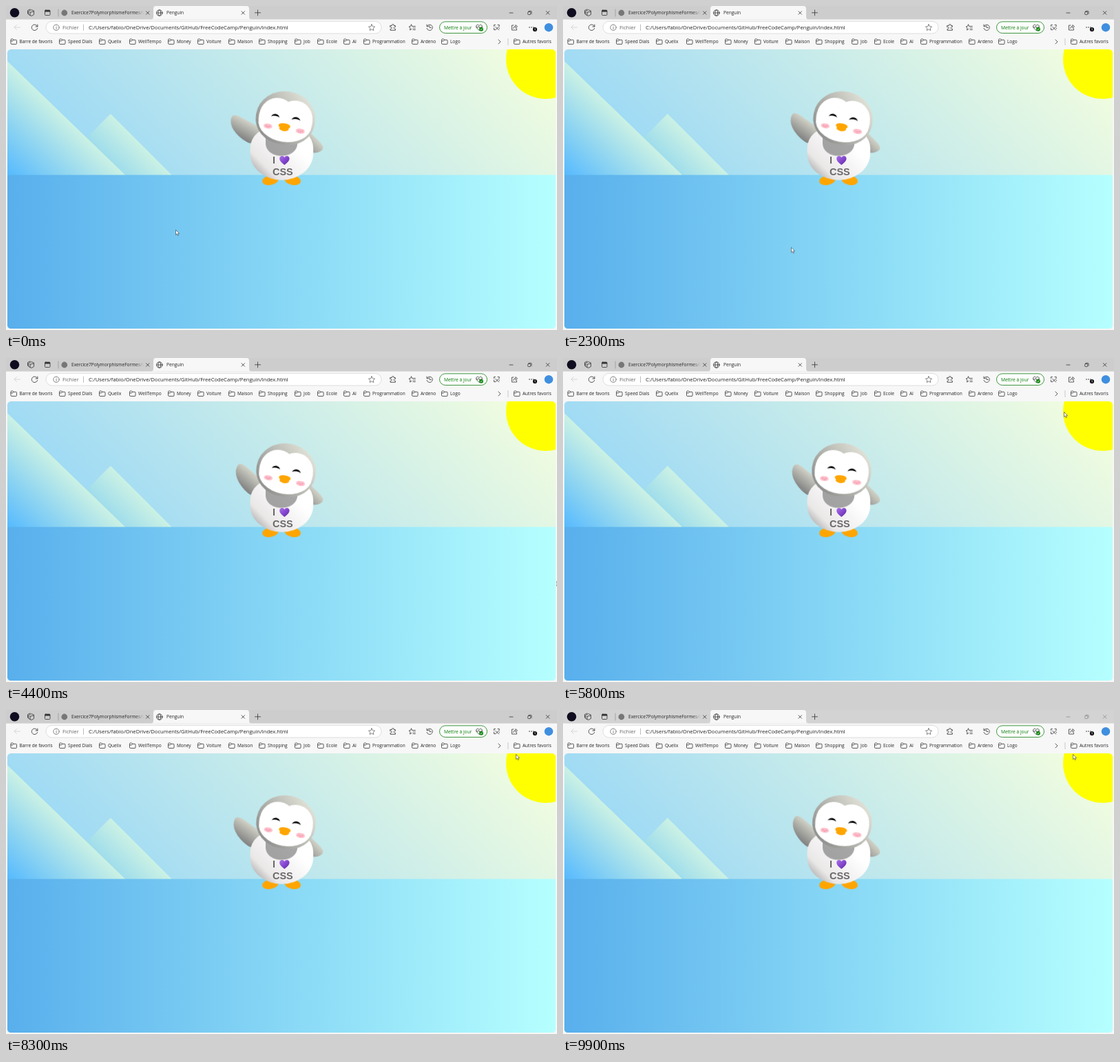
Recreate the animation shown at these times as an HTML page. Size 800 px wide and 471 px high, loop 10 s.

```html
<!DOCTYPE html>
<html lang="fr">
<head>
<meta charset="utf-8">
<title>Penguin</title>
<style>
  html, body { margin: 0; width: 100%; height: 100%; overflow: hidden; background: #f7f7f7; }
  #stage { position: absolute; left: 0; top: 0; width: 800px; height: 471px; overflow: hidden; background: #f7f7f7; }
  #stage > svg { position: absolute; left: 0; top: 0; }
  #ui text { font-family: "Open Sans", "Noto Sans", sans-serif; fill: #222; }
  .line { fill: none; stroke: #333; stroke-width: .8; stroke-linecap: round; stroke-linejoin: round; }

  /* Web page, laid out in its own pixels */
  #page {
    position: absolute; left: 2px; top: 62.7px; width: 1382px; height: 705px;
    transform: scale(.576); transform-origin: 0 0; overflow: hidden; border-radius: 9px;
    background: linear-gradient(45deg, rgb(118,201,255), rgb(247,255,222));
    --skin: gray;
  }
  #page div { position: absolute; }
  .left-mountain {
    width: 300px; height: 300px; left: 0; top: 175px; z-index: 2; transform: skew(0deg, 44deg);
    background: linear-gradient(rgb(203,241,228), rgb(80,183,255));
  }
  .back-mountain {
    width: 300px; height: 300px; left: 110px; top: 225px; z-index: 1; transform: rotate(45deg);
    background: linear-gradient(rgb(203,241,228), rgb(47,170,255));
  }
  .sun { width: 200px; height: 200px; top: -75px; right: -75px; border-radius: 50%; background: yellow; }
  .ground {
    left: 0; top: 317px; width: 100%; height: 388px; z-index: 3;
    background: linear-gradient(90deg, rgb(88,175,236), rgb(182,255,255));
  }
  .penguin { width: 300px; height: 300px; left: 541px; top: 75px; z-index: 4; }
  .head {
    width: 50%; height: 45%; top: 10%; left: 25%; z-index: 1; transform-origin: 50% 100%;
    background: linear-gradient(45deg, var(--skin), rgb(239,240,228)); border-radius: 70% 70% 65% 65%;
  }
  .face { width: 60%; height: 70%; top: 15%; background: white; border-radius: 70% 70% 60% 60%; }
  .face.left, .chin { left: 5%; }
  .face.right { right: 5%; }
  .chin { width: 90%; height: 70%; top: 25%; background: white; border-radius: 70% 70% 100% 100%; }
  .eye { width: 15%; height: 17%; top: 45%; background: black; border-radius: 50%; }
  .eye.left, .foot.left { left: 25%; }
  .eye.right, .foot.right { right: 25%; }
  .lid { width: 150%; height: 100%; top: 25%; left: -23%; background: white; border-radius: 50%; }
  .blush {
    width: 15%; height: 10%; top: 65%; border-radius: 50%;
    background:
      radial-gradient(circle at 32% 50%, #e88aa6 1.2px, transparent 1.9px),
      radial-gradient(circle at 52% 62%, #e88aa6 1.2px, transparent 1.9px),
      radial-gradient(circle at 70% 46%, #e88aa6 1.2px, transparent 1.9px), pink;
  }
  .blush.left { left: 15%; }
  .blush.right { right: 15%; }
  .beak { height: 10%; background: orange; border-radius: 50%; }
  .beak.top { width: 20%; top: 60%; left: 40%; }
  .beak.bottom { width: 16%; top: 65%; left: 42%; }
  .shirt {
    left: 127.5px; top: 191px; z-index: 1; color: #6a6969;
    font: bold 25px/28px "Liberation Sans", Arial, sans-serif;
  }
  .heart { position: absolute; left: 143.5px; top: 193px; z-index: 1; }
  .body {
    width: 53%; height: 45%; top: 40%; left: 23.5%; border-radius: 80% 80% 100% 100%;
    background: linear-gradient(45deg, rgb(134,133,133) 0%, rgb(234,231,231) 25%, white 67%);
  }
  .body::before {
    content: ""; position: absolute; width: 50%; height: 45%; top: 10%; left: 25%;
    background: var(--skin); border-radius: 0 0 100% 100%; opacity: .7;
  }
  .arm {
    width: 30%; height: 60%; z-index: -1; border-radius: 30% 30% 30% 120%;
    background: linear-gradient(90deg, var(--skin), rgb(209,210,199));
  }
  .arm.left { top: 35%; left: 5%; transform-origin: top left; transform: rotate(130deg) scaleX(-1); }
  .arm.right { top: 0; right: -5%; transform: rotate(-45deg); }
  .foot { width: 15%; height: 30%; top: 85%; z-index: -1; background: orange; border-radius: 50%; }
  .foot.left { transform: rotate(80deg); }
  .foot.right { transform: rotate(-80deg); }
</style>
</head>
<body>
<div id="stage">
  <div id="page">
    <div class="left-mountain"></div>
    <div class="back-mountain"></div>
    <div class="sun"></div>
    <div class="penguin">
      <div class="head">
        <div class="face left"></div>
        <div class="face right"></div>
        <div class="chin"></div>
        <div class="eye left"><div class="lid"></div></div>
        <div class="eye right"><div class="lid"></div></div>
        <div class="blush left"></div>
        <div class="blush right"></div>
        <div class="beak top"></div>
        <div class="beak bottom"></div>
      </div>
      <div class="shirt">I<br>CSS</div>
      <svg class="heart" width="27" height="24" viewBox="0 0 27 24">
        <defs>
          <linearGradient id="purple" x1="0" y1="0" x2="1" y2="1">
            <stop offset="0" stop-color="#a873e8"/><stop offset=".5" stop-color="#8548cf"/><stop offset="1" stop-color="#5c2aa0"/>
          </linearGradient>
        </defs>
        <path fill="url(#purple)" d="M13.5 23.5C9 20 1 14.500 1 7.500C1 3.500 4 1 7.300 1C10 1 12.300 2.500 13.500 5C14.700 2.500 17 1 19.700 1C23 1 26 3.500 26 7.500C26 14.500 18 20 13.500 23.500Z"/>
      </svg>
      <div class="body">
        <div class="arm left"></div>
        <div class="arm right"></div>
        <div class="foot left"></div>
        <div class="foot right"></div>
      </div>
    </div>
    <div class="ground"></div>
  </div>

  <svg id="ui" width="800" height="62" viewBox="0 0 800 62">
    <defs>
      <linearGradient id="fade" gradientUnits="userSpaceOnUse" x1="188" y1="0" x2="200" y2="0">
        <stop offset="0" stop-color="#222"/><stop offset="1" stop-color="#222" stop-opacity="0"/>
      </linearGradient>
    </defs>
    <rect width="800" height="62" fill="#f7f7f7"/>
    <rect id="strip" width="800" height="19.5" fill="#cdcdcd"/>
    <path d="M210 19.600Q214 19.600 214 15.500V4Q214 0 218 0H349Q353 0 353 4V15.500Q353 19.600 357 19.600Z" fill="#f7f7f7"/>

    <!-- Tab strip -->
    <circle cx="12.5" cy="9.700" r="6.800" fill="#100d20"/>
    <g class="line">
      <path d="M33 7.500L36.500 5.500L40.500 7V12.500L37 14.500L33 12.500ZM31.500 11V6.500L35 4.800M35 9.300L40 8M35 9.300V13.500"/>
      <rect x="56.500" y="6" width="7.500" height="7.500" rx="1.200"/>
      <path d="M76 5V15" stroke="#999"/>
      <path d="M203.500 7.700L208 12.200M208 7.700L203.500 12.200M342 7.700L346.500 12.200M346.500 7.700L342 12.200"/>
      <path d="M361.500 9.800H369.500M365.500 5.800V13.800"/>
      <circle cx="222.800" cy="10" r="4.300"/>
      <ellipse cx="222.800" cy="10" rx="1.900" ry="4.300"/>
      <path d="M218.500 10H227.100"/>
    </g>
    <rect x="56.500" y="6" width="7.500" height="2.500" fill="#333"/>
    <circle cx="84.800" cy="10" r="4.400" fill="#777"/>
    <text x="95" y="12.300" font-size="6.600" style="fill:url(#fade)">Exercice7PolymorphismeFormes/C</text>
    <text x="233" y="12.300" font-size="6.600">Penguin</text>
    <g id="controls" class="line">
      <path d="M731 10H736M784.300 7.500L789 12.200M789 7.500L784.300 12.200"/>
      <rect x="757.700" y="8.500" width="4" height="4" rx=".8"/>
      <path d="M759 7.300H762Q763 7.300 763 8.300V11.300"/>
    </g>

    <!-- Toolbar -->
    <path class="line" style="stroke:#cfcfcf" d="M20.500 31H12M15.500 27.500L12 31L15.500 34.500"/>
    <path class="line" d="M45.700 30A4.300 4.300 0 1 0 45.700 32.500M45.900 27V30H42.900"/>
    <rect x="58" y="22.300" width="487" height="17.700" rx="8.850" fill="#fff" stroke="#d6d6d6" stroke-width=".8"/>
    <g class="line" style="stroke:#666">
      <circle cx="73" cy="31.200" r="4.200"/>
      <path d="M73 30.800V33.300M73 29V29.100"/>
      <path d="M112.500 27V35.500" stroke="#aaa"/>
      <path id="star" d="M531 26.700L532.400 29.700L535.600 30.100L533.200 32.300L533.800 35.500L531 33.900L528.200 35.500L528.800 32.300L526.400 30.100L529.600 29.700Z"/>
    </g>
    <text x="82" y="34" font-size="7.670" style="fill:#666">Fichier</text>
    <text x="120" y="34" font-size="7.670">C:/Users/fabio/OneDrive/Documents/GitHub/FreeCodeCamp/Penguin/index.html</text>
    <g class="line">
      <path d="M558 28.500H560.300A1.500 1.500 0 1 1 563.200 28.500H565.300V30.500A1.500 1.500 0 1 0 565.300 33.200V35.300H558V33.200A1.500 1.500 0 1 0 558 30.500Z"/>
      <path d="M588.500 27L589.600 29.500H594.300M588.500 27L587.400 29.500L585 30L587 32L586.500 35L589 33.500M591 32H594.300M591 34.500H594.300"/>
      <path d="M611.300 29.500A4.200 4.200 0 1 1 611 32.300M611 27V29.700H613.700M615 28.800V31.500H617.300"/>
    </g>
    <rect x="629.500" y="22.800" width="69" height="16.700" rx="8.350" fill="#fcfffc" stroke="#2e8b2e" stroke-width=".9"/>
    <text x="636" y="33.500" font-size="6.660" style="fill:#0c790c">Mettre à jour</text>
    <path class="line" d="M687 35.500L683.200 31.500C681 28.500 685 25.500 687 28.500C689 25.500 693 28.500 690.800 31.500ZM683 31H685.500L686.500 29.500L688 32.500L689 31H691"/>
    <circle cx="690" cy="33.700" r="3" fill="#178a17"/>
    <path d="M688.600 33.700L689.700 34.800L691.500 32.700" fill="none" stroke="#fff" stroke-width=".7"/>
    <g class="line">
      <path d="M708.500 29.500V27.500H710.500M714 27.500H716.200V29.500M708.500 32V34.500H710M710.500 30L715.500 35M715.500 30L710.500 35M716.200 32V33"/>
      <path d="M737 28H734.500V35H741.500V33M736.500 32.500Q737 29.500 740 29.500V27.500L742.500 30L740 32.300V30.800"/>
      <path d="M715 49L718 52L715 55"/>
      <path d="M729 47.500V56.500" stroke="#bbb"/>
    </g>
    <g fill="#333"><circle cx="760" cy="31" r=".8"/><circle cx="763" cy="31" r=".8"/><circle cx="766" cy="31" r=".8"/></g>
    <circle cx="768" cy="34" r="3.100" fill="#111"/>
    <path d="M767.500 32.900L768.200 32.400V35.600" fill="none" stroke="#fff" stroke-width=".6"/>
    <circle cx="788" cy="31.200" r="6.200" fill="#3f8fe0"/>
    <g id="bookmarks"></g>
  </svg>

  <svg id="cursor" width="8" height="12" viewBox="0 0 8 12">
    <path d="M.5 .5V7.700L2.200 6.200L3.300 8.800L4.500 8.300L3.400 5.800H5.600Z" fill="#fff" stroke="#333" stroke-width=".6" stroke-linejoin="round"/>
  </svg>
</div>

<script>
const LOOP = 10000, STEP = 100, BLUR_AT = 9700;
const $ = s => document.querySelector(s);

const folders = [
  [6.5, "Barre de favoris"], [77, "Speed Dials"], [135, "Quelix"], [179, "WellTempo"],
  [235, "Money"], [278, "Voiture"], [323, "Maison"], [367, "Shopping"], [419, "Job"],
  [452, "Ecole"], [490, "AI"], [519, "Programmation"], [589, "Ardeno"], [632, "Logo"],
  [737, "Autres favoris"]
];
$("#bookmarks").innerHTML = folders.map(([x, label]) => `
  <path class="line" transform="translate(${x} 47.5)" d="M.5 1.500Q.5 .5 1.500 .5H3.500L4.800 1.800H8Q9 1.800 9 2.800V7Q9 8 8 8H1.500Q.5 8 .5 7ZM.5 3.300H3.500L4.800 1.800"/>
  <text x="${x + 13}" y="54.200" font-size="6.500">${label}</text>`).join("");

const wave = deg => `rotate(${deg}deg) scaleX(-1)`;
const tracks = [];
function track(sel, frames, duration, phase) {
  const anim = $(sel).animate(frames, { duration, iterations: Infinity, fill: "both" });
  anim.pause();
  tracks.push({ anim, phase });
}

track(".head", [0, 10, 0].map(a => ({ transform: `rotate(${a}deg)`, easing: "ease" })), 2000, 600);
track(".arm.left", [[0, 130], [.1, 110], [.2, 130], [.3, 110], [.4, 130], [1, 130]]
  .map(([offset, a]) => ({ offset, transform: wave(a) })), 3000, 775);

const pointer = [
  [0, 246, 325], [1500, 227, 294], [3100, 435, 407], [4400, 798.5, 324],
  [5800, 727, 78], [6400, 740, 64], [LOOP, 740, 64]
];
track("#cursor", pointer.map(([t, x, y]) => ({
  offset: t / LOOP, transform: `translate(${x}px, ${y}px)`, easing: "ease-in-out"
})), LOOP, 0);

function draw() {
  const t = Math.floor(performance.now() % LOOP / STEP) * STEP;
  for (const { anim, phase } of tracks) anim.currentTime = t + phase;
  const blurred = t >= BLUR_AT;
  $("#strip").setAttribute("fill", blurred ? "#d3d3d3" : "#cdcdcd");
  $("#controls").style.stroke = blurred ? "#8c8c8c" : "#333";
  requestAnimationFrame(draw);
}
draw();
</script>
</body>
</html>
```
